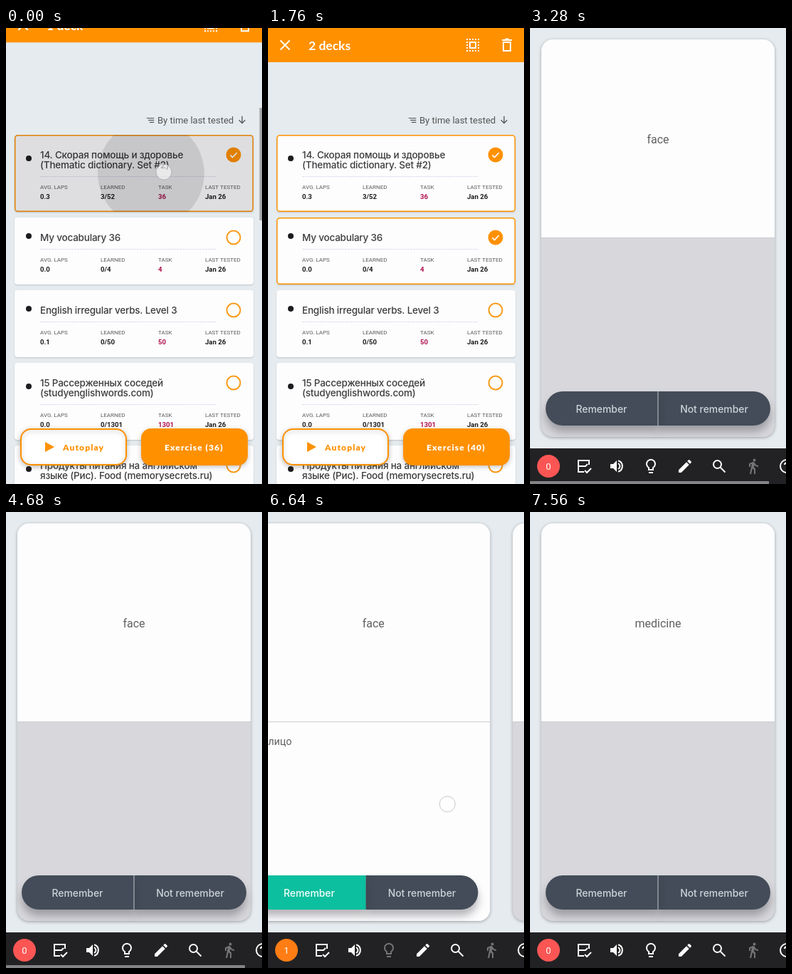
Animation of 360x640 px, one loop 8 s. Source, as an HTML page with a canvas:

```html
<!DOCTYPE html>
<html lang="ru">
<head>
<meta charset="utf-8">
<title>Flashcards</title>
<style>
html, body { margin: 0; height: 100%; overflow: hidden; background: #e5ebee; }
canvas { display: block; width: 360px; height: 640px; }
</style>
</head>
<body>
<canvas id="stage"></canvas>
<script>
const canvas = document.getElementById('stage');
const g = canvas.getContext('2d');
const dpr = window.devicePixelRatio || 1;
canvas.width = 360 * dpr;
canvas.height = 640 * dpr;

const LOOP = 8000;
const ORANGE = '#ff9100', PAGE = '#e5ebee', PANEL = '#d8d8dc', DARK = '#434c58', TEAL = '#0bbf9f';
const INTER = 'Inter, sans-serif', ROBOTO = 'Roboto, sans-serif', LATO = 'Lato, sans-serif';

const decks = [
  { y: 150, title: ['14. Скорая помощь и здоровье', '(Thematic dictionary. Set #2)'], stats: ['0.3', '3/52', '36', 'Jan 26'] },
  { y: 266, title: ['My vocabulary 36'], stats: ['0.0', '0/4', '4', 'Jan 26'] },
  { y: 368, title: ['English irregular verbs. Level 3'], stats: ['0.1', '0/50', '50', 'Jan 26'] },
  { y: 470, title: ['15 Рассерженных соседей', '(studyenglishwords.com)'], stats: ['0.0', '0/1301', '1301', 'Jan 26'] },
  { y: 586, title: ['Продукты питания на английском', 'языке (Рис). Food (memorysecrets.ru)'], stats: ['0.0', '0/80', '80', 'Jan 26'] }
];
const labels = ['AVG. LAPS', 'LEARNED', 'TASK', 'LAST TESTED'];
const columns = [48, 133, 214, 280];

// 24 x 24 icons
const icons = {
  close: 'M5.5 5.5l13 13M18.5 5.5l-13 13',
  trash: 'M7 8v12h10V8zM5 5h14M9.5 3.5h5',
  sort: 'M3 6h18M7 11h14M10 16h11',
  down: 'M12 4v15M5.5 12.5L12 19l6.500-6.500',
  check: 'M6.500 12.500l3.700 3.700 7.500-7.800',
  list: 'M19 10V4H4v16h8M4 12h10l3-3M13 18l3 3 6-6',
  bulb: 'M9 17v-3a6 6 0 1 1 6 0v3zM9 21h6',
  search: 'M15 9.500a5.500 5.500 0 1 1-11 0a5.500 5.500 0 1 1 11 0M14 14l6.500 6.500',
  help: 'M21 12a9 9 0 1 1-18 0a9 9 0 1 1 18 0M9 10a3 3 0 1 1 4 3q-1 .5-1 2',
  waves: 'M14 8q2.500 1.500 2.500 4t-2.500 4M14 4.300a8 8 0 0 1 0 15.400',
  speaker: 'M3 9v6h4l5 5V4L7 9z',
  pencil: 'M3 17.250V21h3.750L17.800 9.940l-3.750-3.750zM20.700 7a1 1 0 0 0 0-1.400l-2.340-2.340a1 1 0 0 0-1.400 0l-1.830 1.830 3.750 3.750z',
  walk: 'M15.500 3.500a2 2 0 1 1-4 0a2 2 0 1 1 4 0M9.800 8.900L7 23h2.100l1.800-8 2.100 2v6h2v-7.500l-2.100-2 .6-3C14.800 12 16.800 13 19 13v-2c-1.900 0-3.500-1-4.300-2.400l-1-1.600q-1-1.500-2.500-.9L6 8.300V13h2V9.600z'
};
for (const k in icons) icons[k] = new Path2D(icons[k]);

const ramp = (t, a, b) => Math.min(1, Math.max(0, (t - a) / (b - a)));
const pulse = (t, a, b, c, d) => ramp(t, a, b) * (1 - ramp(t, c, d));
// short pick-up by the finger, then a long settle
const swipe = u => 1 - (1 - u ** 1.6) ** 3;

function faded(alpha, draw) {
  if (alpha <= 0) return;
  g.save();
  g.globalAlpha *= alpha;
  draw();
  g.restore();
}

// A pressed button swells and turns translucent
function pressed(amount, x, y, draw) {
  g.save();
  g.translate(x, y);
  g.scale(1 + 0.077 * amount, 1 + 0.077 * amount);
  g.translate(-x, -y);
  faded(1 - 0.3 * amount, draw);
  g.restore();
}

function text(s, x, y, font, color, align = 'left', spacing = 0) {
  g.font = font;
  g.fillStyle = color;
  g.textAlign = align;
  g.letterSpacing = spacing + 'px';
  g.fillText(s, x, y);
}

function box(x, y, w, h, r, fill, stroke, width = 1.5) {
  g.beginPath();
  g.roundRect(x, y, w, h, r);
  if (fill) { g.fillStyle = fill; g.fill(); }
  if (stroke) { g.strokeStyle = stroke; g.lineWidth = width; g.stroke(); }
}

function disc(x, y, r, fill, stroke, width) {
  box(x - r, y - r, 2 * r, 2 * r, r, fill, stroke, width);
}

function shadowed(color, blur, dy, draw) {
  g.save();
  g.shadowColor = color;
  g.shadowBlur = blur * dpr;
  g.shadowOffsetY = dy * dpr;
  draw();
  g.restore();
}

function icon(name, x, y, color, { size = 24, width = 2, solid = false } = {}) {
  g.save();
  g.translate(x - size / 2, y - size / 2);
  g.scale(size / 24, size / 24);
  g.lineWidth = width;
  g.strokeStyle = g.fillStyle = color;
  solid ? g.fill(icons[name]) : g.stroke(icons[name]);
  g.restore();
}

function touch(x, y, alpha) {
  faded(alpha, () => disc(x, y, 11, 'rgba(255,255,255,.6)', 'rgba(120,120,125,.5)', 0.8));
}

function drawDeck({ y, title, stats }, selected, ripple) {
  const h = 80 + 14 * title.length;
  shadowed('rgba(80,80,90,.25)', 2, 1, () => box(12, y, 336, h, 4, '#fdfdfe'));
  if (selected) box(12.7, y + 0.7, 334.6, h - 1.4, 4, null, ORANGE);
  disc(32, y + 19 + 7 * title.length, 4, '#1c1c1e');
  title.forEach((s, i) => text(s, 48, y + 32.5 + 14 * i, '500 13.5px ' + INTER, '#3c3c3e', 'left', -0.2));

  const end = y + 14 * title.length;
  g.strokeStyle = '#dcdcec';
  g.lineWidth = 1;
  g.setLineDash([3, 1]);
  g.beginPath();
  g.moveTo(48, end + 30.5);
  g.lineTo(295, end + 30.5);
  g.stroke();
  g.setLineDash([]);
  labels.forEach((s, i) => {
    text(s, columns[i], end + 48, '8px ' + ROBOTO, '#5c5c5e');
    text(stats[i], columns[i], end + 61.5, '700 9.6px ' + ROBOTO, i === 2 ? '#b0104c' : '#1c1c1e');
  });

  disc(320, y + 28, selected ? 10.5 : 9.5, selected ? ORANGE : '#fff', selected ? null : '#f99a18', 2);
  if (selected) icon('check', 320, y + 28, '#fff', { size: 20 });

  if (ripple) faded(ripple.alpha, () => {
    box(12, y, 336, h, 4);
    g.clip();
    box(12, y, 336, h, 0, 'rgba(0,0,10,.12)');
    disc(ripple.x, ripple.y, ripple.r, 'rgba(0,0,10,.1)');
  });
}

function drawToolbar(y, count) {
  g.save();
  g.translate(0, y);
  box(0, 0, 360, 48, 0, ORANGE);
  icon('close', 24, 24, '#fff');
  text(count === 1 ? '1 deck' : count + ' decks', 57, 30.5, '700 17.5px ' + LATO, '#fff');
  g.fillStyle = '#fff';
  for (let i = 0; i < 5; i++) {
    for (const [a, b] of [[i, 0], [i, 4], [0, i], [4, i]]) g.fillRect(279 + 4 * a, 15 + 4 * b, 2, 2);
  }
  box(284, 20, 8, 8, 0, null, '#fff', 2);
  icon('trash', 336, 24, '#fff');
  g.restore();
}

function drawDecks(t) {
  box(0, 0, 360, 640, 0, PAGE);
  icon('sort', 203, 130, '#545456', { size: 14 });
  text('By time last tested', 213, 134, '13px ' + ROBOTO, '#545456');
  icon('down', 332, 129, '#545456', { size: 16 });

  const grow = ramp(t, 0, 280), tap = ramp(t, 1120, 1440);
  const count = t < 1280 ? 1 : 2;
  const ripples = [
    { x: 204 - 24 * grow, y: 204, r: 74.5 + 120 * grow, alpha: 1 - ramp(t, 500, 800) },
    { x: 222 - 42 * tap, y: 313, r: 20 + 170 * tap, alpha: pulse(t, 1080, 1160, 1400, 1720) }
  ];
  decks.forEach((d, i) => drawDeck(d, i < count, ripples[i]));

  faded(1 - ramp(t, 1080, 1330), () => box(356.5, 112, 3.5, 158, 0, '#a4a5a8'));
  drawToolbar(-28 * (1 - ramp(t, 0, 180)) ** 2, count);

  const shade = 'rgba(70,60,50,.3)';
  shadowed(shade, 6, 2, () => box(21, 563, 148, 50, 14, '#fff', ORANGE, 2));
  g.fillStyle = ORANGE;
  g.beginPath();
  g.moveTo(55, 581);
  g.lineTo(68, 588);
  g.lineTo(55, 595);
  g.fill();
  text('Autoplay', 80, 592.5, '900 12px ' + LATO, ORANGE, 'left', 1.1);
  pressed(pulse(t, 2240, 2420, 2600, 2800), 265, 588, () => {
    shadowed(shade, 6, 2, () => box(190, 562, 150, 52, 14, ORANGE));
    text(`Exercise (${count === 1 ? 36 : 40})`, 223, 592.5, '900 12px ' + LATO, '#fff', 'left', 1.1);
  });

  touch(222, 202, 1 - ramp(t, 320, 600));
  touch(222, 313, pulse(t, 1080, 1120, 1280, 1480));
  touch(265, 590, pulse(t, 2200, 2240, 2560, 2760));
}

function drawAnswers(press, known) {
  const font = '500 13.9px ' + INTER, pale = '#ccd3da', shade = 'rgba(50,50,60,.35)';
  shadowed(shade, 12, 9, () => box(180, 510, 158, 48, [0, 24, 24, 0], DARK));
  text('Not remember', 259, 539.5, font, pale, 'center');
  pressed(press, 101, 534, () => {
    const half = [22, 510, 158, 48, [24, 0, 0, 24]];
    shadowed(shade, 12, 9, () => box(...half, DARK));
    faded(known, () => box(...half, TEAL));
    text('Remember', 100.5, 539.5, font, known > 0.5 ? '#f6fffc' : pale, 'center');
  });
  faded((1 - press) * (1 - known), () => box(179.5, 510, 1, 48, 0, '#c2c4c9'));
}

function drawCard(dx, word, answer, press, known) {
  if (dx <= -360 || dx >= 360) return;
  g.save();
  g.translate(dx, 0);
  shadowed('rgba(70,70,80,.45)', 4, 1, () => box(16, 16, 328, 558, 16, PANEL));
  faded(known, () => box(16, 295, 328, 279, [0, 0, 16, 16], '#fdfdfe'));
  box(16, 16, 328, 279, [16, 16, 0, 0], '#fdfdfe');
  box(16, 294, 328, 1, 0, '#cbccd0');
  text(word, 180, 161.5, '16px ' + ROBOTO, '#606062', 'center');
  faded(known, () => text(answer, 32, 327, '14.3px ' + ROBOTO, '#606062'));
  // the answer bar travels faster than its card
  g.translate(dx * 0.34, 0);
  drawAnswers(press, known);
  g.restore();
}

function drawTools(score, scrollbar) {
  const white = '#fdfdfd', dim = '#747476';
  box(0, 590, 360, 50, 0, '#222224');
  disc(26, 615, 16, score ? '#ff7d14' : '#fb5654');
  text(score, 26, 619.5, '13px ' + ROBOTO, '#fff', 'center');
  icon('list', 76, 615, white);
  icon('speaker', 122, 615, white, { solid: true });
  icon('waves', 122, 615, white);
  icon('bulb', 170, 615, score ? dim : white);
  icon('pencil', 218, 615, white, { solid: true });
  icon('search', 266, 615, white);
  icon('walk', 314, 615, dim, { solid: true });
  icon('help', 361, 615, white);
  faded(scrollbar, () => box(0, 636, 336, 4, 0, '#858588'));
}

function drawExercise(t) {
  const slide = -360 * swipe(ramp(t, 6560, 7280));
  const press = pulse(t, 5220, 5400, 5560, 5740);
  box(0, 0, 360, 640, 0, PAGE);
  drawCard(slide, 'face', 'лицо', press, ramp(t, 5600, 5840));
  drawCard(slide + 360, 'medicine', '', 0, 0);
  drawTools(t >= 5760 && t < 7240 ? 1 : 0, 1 - ramp(t, 4680, 5000));
  touch(121, 531, pulse(t, 5200, 5240, 5560, 5760));
  touch(284 + Math.max(slide, -150), 410, pulse(t, 6440, 6500, 6760, 6960));
}

function frame(now) {
  const t = now % LOOP;
  g.setTransform(dpr, 0, 0, dpr, 0, 0);
  if (t < 3260) drawDecks(t);
  faded(ramp(t, 3030, 3260), () => drawExercise(t));
  requestAnimationFrame(frame);
}
requestAnimationFrame(frame);
</script>
</body>
</html>
```
